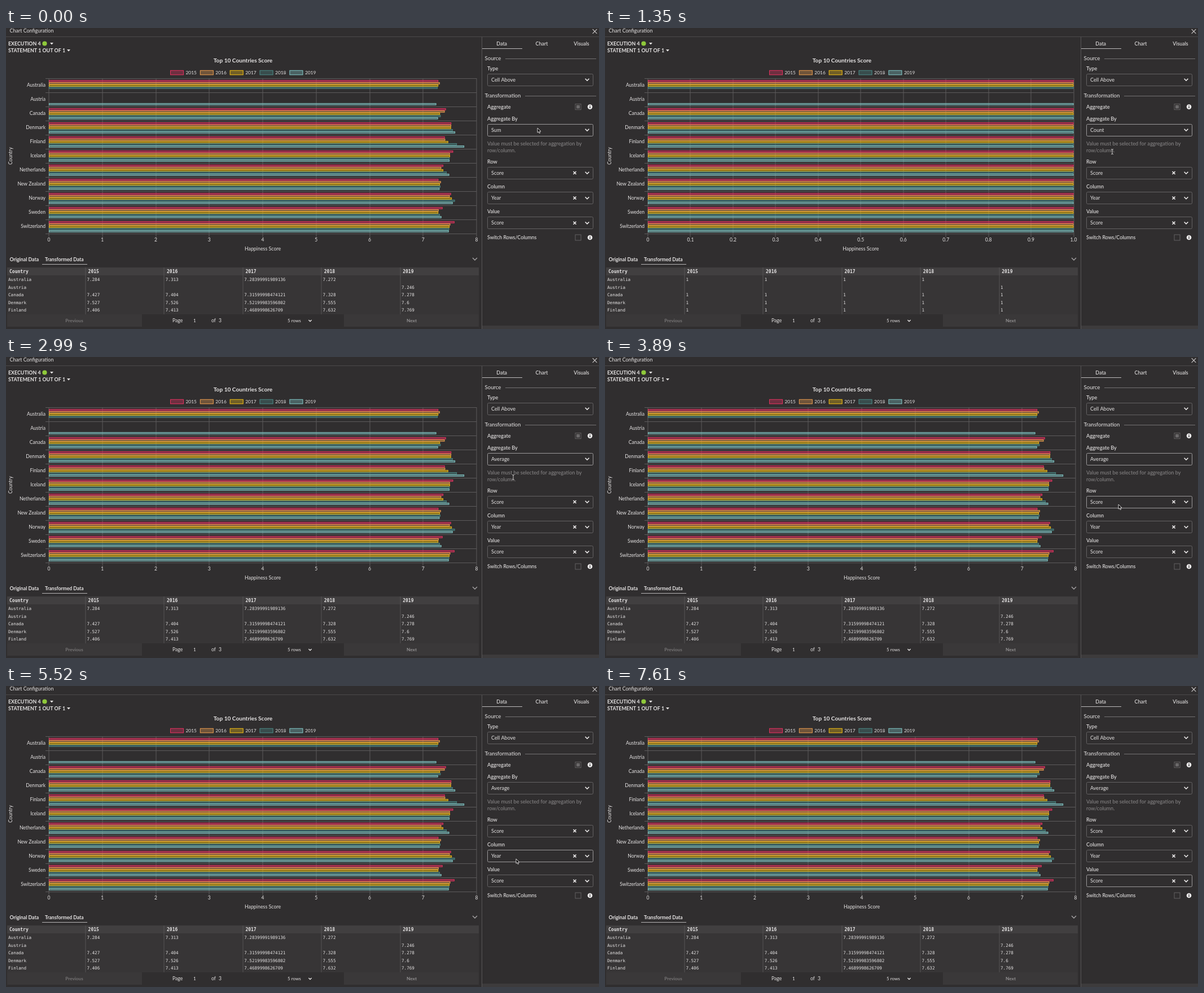
Recreate the animation shown at these times as an HTML page with a canvas. Size 1051 by 533 pixels, loop 7740 ms.

```html
<!DOCTYPE html>
<html lang="en">
<head>
<meta charset="utf-8">
<title>Chart Configuration</title>
<style>
  html, body { margin: 0; width: 100%; height: 100%; overflow: hidden; background: #302e2f; }
  canvas { display: block; width: 1051px; height: 533px; }
</style>
</head>
<body>
<canvas id="stage"></canvas>
<script>
const W = 1051, H = 533, LOOP = 7740, STEP = 149.1;
const SANS = 'Lato, "Open Sans", sans-serif';
const MONO = '"DejaVu Sans Mono", monospace';
const BG = '#302e2f', INK = '#e6e4e4', DIM = '#8b898a';

const canvas = document.getElementById('stage');
const ctx = canvas.getContext('2d');
const ratio = window.devicePixelRatio || 1;
canvas.width = W * ratio;
canvas.height = H * ratio;

const YEARS = ['2015', '2016', '2017', '2018', '2019'];
const COLORS = ['#e2325f', '#e59a4e', '#ecba16', '#4a8783', '#7fc4c2'];
const SCORES = {
  'Australia': [7.284, 7.313, 7.284, 7.272, 0],
  'Austria': [0, 0, 0, 0, 7.246],
  'Canada': [7.427, 7.404, 7.316, 7.328, 7.278],
  'Denmark': [7.527, 7.526, 7.522, 7.555, 7.6],
  'Finland': [7.406, 7.413, 7.469, 7.632, 7.769],
  'Iceland': [7.561, 7.501, 7.504, 7.495, 7.494],
  'Netherlands': [7.378, 7.339, 7.377, 7.441, 7.488],
  'New Zealand': [7.286, 7.334, 7.314, 7.324, 7.307],
  'Norway': [7.522, 7.498, 7.537, 7.594, 7.554],
  'Sweden': [7.364, 7.291, 7.284, 7.314, 7.343],
  'Switzerland': [7.587, 7.509, 7.494, 7.487, 7.48]
};
const COUNTRIES = Object.keys(SCORES);
// Unrounded 2017 sums shown in the table
const LONG = {
  'Australia': '7.28399991989136', 'Canada': '7.31599998474121',
  'Denmark': '7.52199983596802', 'Finland': '7.4689998626709'
};

// Timeline, counted in screen refreshes of STEP ms
const MENUS = [
  { from: 1, to: 8, field: 'agg' },
  { from: 15, to: 19, field: 'agg' },
  { from: 28, to: 31, field: 'row' },
  { from: 34, to: 37, field: 'col' },
  { from: 41, to: 43, field: 'val' }
];
const CARETS = [[1, 5], [15, 19], [28, 32], [34, 37], [41, 44], [47, 51]];
const PATH = [
  [0, 942, 177], [1, 942, 179], [5, 901, 226], [8, 900, 225], [9, 899, 219],
  [13, 899, 181], [15, 899, 181], [16, 899, 203], [18, 899, 206], [19, 899, 207],
  [20, 899, 213], [22, 905, 249], [26, 910, 261], [31, 910, 261], [34, 904, 304],
  [37, 904, 306], [41, 906, 346], [43, 906, 352], [46, 912, 476]
];
const FIELDS = {
  type: { y: 91.5 },
  agg: { y: 180.5, options: ['Average', 'Count', 'Min', 'Max', 'Median', 'Sum'] },
  row: { y: 256.5, options: ['Year', 'Score'], clear: true },
  col: { y: 301, options: ['Year', 'Score'], clear: true },
  val: { y: 345.2, options: ['Year', 'Score'], clear: true }
};

function rect(x, y, w, h, color) {
  ctx.fillStyle = color;
  ctx.fillRect(x, y, w, h);
}

function line(points, color, width = 1) {
  ctx.beginPath();
  points.forEach(([x, y], i) => i ? ctx.lineTo(x, y) : ctx.moveTo(x, y));
  ctx.strokeStyle = color;
  ctx.lineWidth = width;
  ctx.stroke();
}

function shape(points, color) {
  ctx.beginPath();
  points.forEach(([x, y]) => ctx.lineTo(x, y));
  ctx.closePath();
  ctx.fillStyle = color;
  ctx.fill();
}

function disc(x, y, r, color) {
  ctx.beginPath();
  ctx.arc(x, y, r, 0, Math.PI * 2);
  ctx.fillStyle = color;
  ctx.fill();
}

// y is the middle of the capital letters
function text(s, x, y, { size = 9.1, weight = 400, color = INK, align = 'left', font = SANS } = {}) {
  ctx.font = `${weight} ${size}px ${font}`;
  ctx.fillStyle = color;
  ctx.textAlign = align;
  ctx.fillText(s, x, y + size * 0.36);
}

function cross(x, y, r, color, width) {
  line([[x - r, y - r], [x + r, y + r]], color, width);
  line([[x + r, y - r], [x - r, y + r]], color, width);
}

function chevron(x, y, r, color, width) {
  line([[x - r, y - r / 2], [x, y + r / 2], [x + r, y - r / 2]], color, width);
}

function drawHeader() {
  text('Chart Configuration', 6.5, 5.2, { size: 8.95 });
  cross(1043.5, 6, 3.8, '#c8c6c6', 1.2);
  rect(0, 15, W, 1, '#4c4a4b');
  rect(843, 16, 1, H - 16, '#575556');

  const bold = { size: 8.85, weight: 700 };
  text('EXECUTION 4', 4, 27.5, bold);
  text('STATEMENT 1 OUT OF 1', 4, 39.7, bold);
  disc(68.5, 27.5, 4.1, '#8fc93a');
  for (const [x, y] of [[81, 27.5], [111, 39.5]]) {
    shape([[x - 3, y - 1.5], [x + 3, y - 1.5], [x, y + 2]], INK);
  }
}

function drawChart(counting) {
  const left = 76, top = 89, bottom = 364, rowH = 25;
  const right = counting ? 830.5 : 834;
  const mid = (left + right) / 2;
  const max = counting ? 1 : 8;
  const ticks = counting ? 10 : 8;

  text('Top 10 Countries Score', 420, 57, { size: 10.15, weight: 700, align: 'center' });
  YEARS.forEach((year, i) => {
    const x = 291 + i * 52.85;
    bar(x, 74.8, 24, 8.5, COLORS[i]);
    text(year, x + 27.5, 78.7, { size: 8.4 });
  });

  for (let i = 0; i <= ticks; i++) {
    const x = left + (right - left) * i / ticks;
    rect(Math.round(x) - 0.5, top, 1, bottom - top + 6, '#5d5b5c');
    const label = counting && i ? (i / 10).toFixed(1) : String(i);
    text(label, x, 374.7, { size: 8.5, align: 'center' });
  }
  for (let i = 0; i <= COUNTRIES.length; i++) {
    rect(left - 6, top + i * rowH, right - left + 6, 1, '#5d5b5c');
  }
  COUNTRIES.forEach((name, row) => {
    const y = top + rowH * (row + 0.5);
    text(name, 70, y - 0.4, { size: 8.6, align: 'right' });
    SCORES[name].forEach((score, i) => {
      if (!score) return;
      const value = counting ? 1 : score;
      bar(left, y + (i - 2) * 4 - 1.4, (right - left) * value / max, 3.6, COLORS[i]);
    });
  });
  text('Happiness Score', mid, 391, { size: 8.85, align: 'center' });

  ctx.save();
  ctx.translate(8, 226.5);
  ctx.rotate(-Math.PI / 2);
  text('Country', 0, 0, { size: 8.7, align: 'center' });
  ctx.restore();
}

function bar(x, y, w, h, color) {
  ctx.globalAlpha = 0.35;
  rect(x, y, w, h, color);
  ctx.globalAlpha = 1;
  ctx.strokeStyle = color;
  ctx.lineWidth = 1;
  ctx.strokeRect(x + 0.5, y + 0.5, w - 1, h - 1);
}

function drawTable(counting) {
  text('Original Data', 6.5, 409.5, { size: 8.75, weight: 700 });
  text('Transformed Data', 69, 409.5, { size: 8.6, weight: 700 });
  rect(64, 418, 80, 1, '#b5b3b4');
  chevron(831, 409, 4, '#a9a7a8', 1.3);

  rect(2, 424, 836, 83, '#373536');
  rect(2, 424, 836, 14, '#413f40');
  const colX = i => 141 + i * 139.4;
  YEARS.forEach((year, i) => {
    rect(Math.round(colX(i)) - 0.5, 424, 1, 83, '#565455');
    text(year, colX(i) + 4.6, 431.3, { size: 8, weight: 700, font: MONO });
  });
  text('Country', 6, 431.3, { size: 8, weight: 700, font: MONO });
  COUNTRIES.slice(0, 5).forEach((name, row) => {
    const y = 445.3 + row * 13.5;
    text(name, 4, y, { size: 7.6, font: MONO });
    SCORES[name].forEach((score, i) => {
      if (!score) return;
      const cell = counting ? '1' : i === 2 ? LONG[name] : String(score);
      text(cell, colX(i) + 2.4, y, { size: 7.6, font: MONO });
    });
  });

  rect(2, 507, 239, 22, '#3a3839');
  rect(599, 507, 239, 22, '#3a3839');
  text('Previous', 121, 518.2, { size: 8.2, weight: 700, color: '#777576', align: 'center' });
  text('Next', 719, 518.2, { size: 8.3, weight: 700, color: '#939192', align: 'center' });
  text('Page', 295, 518.2, { size: 8.6 });
  text('1', 334.3, 518.2, { size: 8.2, align: 'center' });
  text('of', 364, 518.2, { size: 8.6 });
  text('3', 377, 518.2, { size: 8.6 });
  text('5 rows', 499, 518.2, { size: 8 });
  chevron(539, 518.3, 2.6, INK, 1.4);
}

function drawHeading(label, y, lineX) {
  text(label, 848.5, y, { size: 9.65 });
  rect(lineX, Math.round(y), 1046 - lineX, 1, '#737172');
}

function drawCheck(label, y, on) {
  text(label, 853, y, { size: on ? 9.25 : 8.85, weight: 500 });
  ctx.strokeStyle = '#636162';
  ctx.lineWidth = 1;
  ctx.strokeRect(1009, y - 5, 10, 10);
  if (on) rect(1011, y - 3, 6, 6, '#6b696a');
  disc(1035, y, 4.3, '#f2f0f0');
  rect(1034.3, y - 0.7, 1.4, 3.2, BG);
  rect(1034.3, y - 2.7, 1.4, 1.3, BG);
}

function drawSelect(field, value, bright) {
  const { y, clear } = field;
  ctx.beginPath();
  ctx.roundRect(853.5, Math.round(y - 11) + 0.5, 187, 21, 2);
  ctx.strokeStyle = bright ? '#9b999a' : '#646263';
  ctx.lineWidth = 1;
  ctx.stroke();
  text(value, 860, y, { size: 9.1 });
  if (clear) cross(1008, y, 2.5, '#f0eeee', 1.6);
  chevron(1030, y, 3.4, '#f0eeee', 1.6);
}

function drawMenu(field, selected) {
  const { y, options } = field;
  const itemH = 21.9, first = y + 18;
  rect(853, y + 13.5, 188, 4.5 + options.length * itemH + 3, '#2a2829');
  options.forEach((name, i) => {
    const on = name === selected;
    const itemY = first + i * itemH;
    if (on) rect(853, itemY, 188, itemH, '#5b595a');
    text(name, 860, itemY + itemH / 2, { color: on ? '#928f91' : INK });
  });
}

function drawPanel(f, pointer, menu) {
  const small = { size: 8.9, weight: 500, align: 'center' };
  text('Data', 878.7, 27.3, small);
  text('Chart', 949.5, 27.3, small);
  text('Visuals', 1020, 27.3, small);
  rect(844, 36, 71, 1, '#bdbbbc');
  drawHeading('Source', 53.5, 885);
  drawHeading('Transformation', 119.6, 920);

  const label = { weight: 500, size: 9.1 };
  text('Type', 853, 72, label);
  drawCheck('Aggregate', 139.6, true);
  text('Aggregate By', 853, 160.3, label);
  const note = { size: 9.15, color: DIM };
  text('Value must be selected for aggregation by', 853, 204.7, note);
  text('row/column.', 853, 217.2, note);
  text('Row', 853, 236.7, label);
  text('Column', 853, 281, label);
  text('Value', 853, 325.2, label);
  drawCheck('Switch Rows/Columns', 371, false);

  const values = {
    type: 'Cell Above',
    agg: f < 8 ? 'Sum' : f < 19 ? 'Count' : 'Average',
    row: 'Score', col: 'Year', val: 'Score'
  };
  const focus = f < 28 ? 'agg' : f < 34 ? 'row' : f < 41 ? 'col' : 'val';
  for (const key in FIELDS) {
    const hover = pointer && Math.abs(pointer.y - FIELDS[key].y) < 11;
    drawSelect(FIELDS[key], values[key], key === focus || hover && !menu);
  }
  if (CARETS.some(([a, b]) => f >= a && f < b)) {
    rect(859, Math.round(FIELDS[focus].y - 5.5), 1, 11, INK);
  }
  if (menu) drawMenu(FIELDS[menu.field], values[menu.field]);
  rect(844, 527, W - 844, 6, '#3d3b3c');
}

function pointerAt(f) {
  if (f >= 47) return null;
  const next = PATH.findIndex(([k]) => k > f);
  if (next < 0) return { x: PATH[PATH.length - 1][1], y: PATH[PATH.length - 1][2] };
  const [k0, x0, y0] = PATH[next - 1], [k1, x1, y1] = PATH[next];
  const p = (f - k0) / (k1 - k0);
  return { x: x0 + (x1 - x0) * p, y: y0 + (y1 - y0) * p };
}

function drawPointer({ x, y }, overText) {
  ctx.save();
  ctx.translate(x, y);
  if (overText) {
    const beam = (color, width) => {
      line([[0, -4], [0, 4]], color, width);
      line([[-2, -4.5], [0, -3.8], [2, -4.5]], color, width);
      line([[-2, 4.5], [0, 3.8], [2, 4.5]], color, width);
    };
    beam('#1a1819', 2);
    beam('#dddbdb', 1);
  } else {
    const arrow = [[0, 0], [0, 8.2], [1.9, 6.6], [3.2, 9.5], [4.6, 8.9], [3.4, 6.1], [6, 6]];
    shape(arrow, '#0c0b0b');
    line([...arrow, arrow[0]], '#e9e7e7', 0.9);
  }
  ctx.restore();
}

function draw(now) {
  const f = Math.floor((now % LOOP + 4) / STEP);
  const counting = f >= 9 && f < 20;
  const menu = MENUS.find(m => f >= m.from && f < m.to);
  const pointer = pointerAt(f);

  ctx.setTransform(ratio, 0, 0, ratio, 0, 0);
  rect(0, 0, W, H, BG);
  drawHeader();
  drawChart(counting);
  drawTable(counting);
  drawPanel(f, pointer, menu);
  if (pointer) drawPointer(pointer, !menu && pointer.y > 199 && pointer.y < 223);
}

const start = performance.now();
function tick() {
  draw(performance.now() - start);
  requestAnimationFrame(tick);
}
tick();
</script>
</body>
</html>
```
